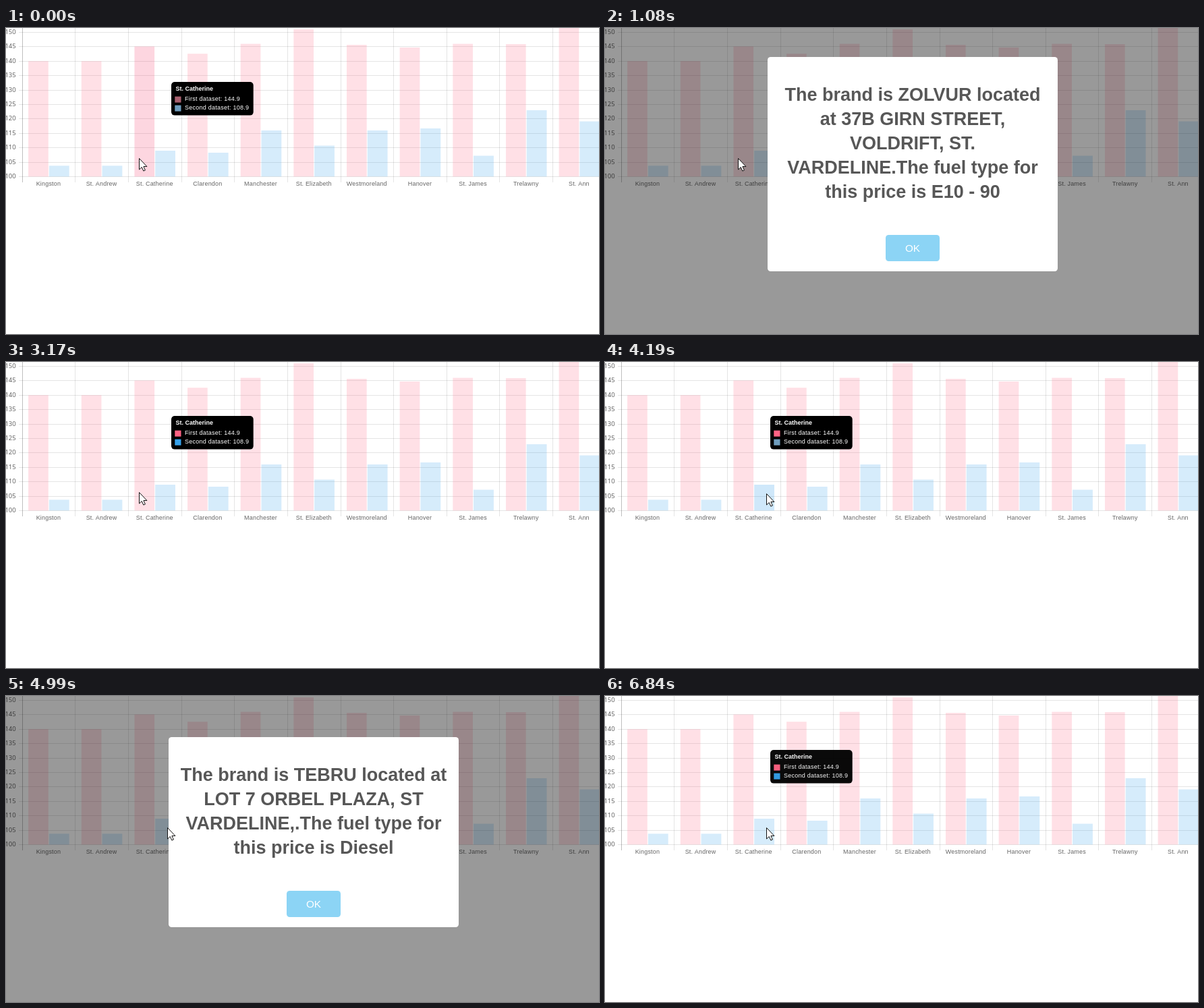
Recreate the animation shown at these times as an HTML page with a canvas. Size 879 px wide and 454 px high, loop 7150 ms.

```html
<!DOCTYPE html>
<html lang="en">
<head>
<meta charset="utf-8">
<title>Price chart</title>
<style>
  html, body { margin: 0; width: 100%; height: 100%; overflow: hidden; background: #fff; }
  canvas { display: block; width: 879px; height: 454px; }
</style>
</head>
<body>
<canvas id="stage" width="879" height="454"></canvas>
<script>
const W = 879, H = 454, LOOP = 7150;
const stage = document.getElementById('stage').getContext('2d');
const layer = document.createElement('canvas').getContext('2d');
layer.canvas.width = W;
layer.canvas.height = H;
let ctx = stage;

const SANS = '"Liberation Sans", Arial, sans-serif';
const BASE = 220.5, LEFT = 24, STEP = 78.65;

const parishes = [
  'Kingston', 'St. Andrew', 'St. Catherine', 'Clarendon', 'Manchester', 'St. Elizabeth',
  'Westmoreland', 'Hanover', 'St. James', 'Trelawny', 'St. Ann'
];
const pinkTops = [49.2, 49.2, 27.4, 38.2, 23.5, 2, 25, 29, 23.5, 24, -20];
const blueTops = [204.3, 204.3, 182, 185, 152, 174.5, 152, 149, 189.5, 122, 138.5];

const PINK = 'rgba(255,99,132,.2)', PINK_HOVER = 'rgba(245,50,100,.2)';
const BLUE = 'rgba(54,162,235,.2)', BLUE_HOVER = 'rgba(15,140,230,.2)';
const KEY = { pink: '#ff6384', blue: '#36a2eb', pinkSoft: '#a8606f', blueSoft: '#6f9dbd' };

const dialogs = [
  { open: 750, close: 2610, gone: 2710, height: 318, lines: [
    'The brand is ZOLVUR located', 'at 37B GIRN STREET,', 'VOLDRIFT, ST.',
    'VARDELINE.The fuel type for', 'this price is E10 - 90'] },
  { open: 4650, close: 6450, gone: 6530, height: 282, lines: [
    'The brand is TEBRU located at', 'LOT 7 ORBEL PLAZA, ST',
    'VARDELINE,.The fuel type for', 'this price is Diesel'] }
];

const clamp = (v) => Math.max(0, Math.min(1, v));
const mix = (a, b, p) => a + (b - a) * p;
const outQuart = (p) => 1 - Math.pow(1 - clamp(p), 4);

// cubic-bezier(.25, .1, .25, 1)
function ease(x) {
  let lo = 0, hi = 1;
  for (let i = 0; i < 24; i++) {
    const s = (lo + hi) / 2, r = 1 - s;
    if (.75 * r * r * s + .75 * r * s * s + s * s * s < x) lo = s; else hi = s;
  }
  const s = lo, r = 1 - s;
  return .3 * r * r * s + 3 * r * s * s + s * s * s;
}

// The screen refreshes slowly: first hold is 100 ms, the rest are equal
const GAP = 76.6;
function held(t) {
  return t < 100 ? 0 : 100 + Math.floor((t - 100) / GAP) * GAP;
}

function popScale(ms) {
  const p = ms / 300;
  if (p < .45) return mix(.7, 1.05, ease(p / .45));
  if (p < .8) return mix(1.05, .95, ease((p - .45) / .35));
  return p < 1 ? mix(.95, 1, ease((p - .8) / .2)) : 1;
}

function text(str, x, y, font, color, align = 'left', spacing = 0, baseline = 'middle') {
  ctx.font = font;
  ctx.fillStyle = color;
  ctx.textAlign = align;
  ctx.textBaseline = baseline;
  ctx.letterSpacing = spacing + 'px';
  ctx.fillText(str, x, y);
}

function box(x, y, w, h, r, color) {
  ctx.beginPath();
  ctx.roundRect(x, y, w, h, r);
  ctx.fillStyle = color;
  ctx.fill();
}

function drawChart(hoverPink, hoverBlue) {
  ctx.fillStyle = '#fff';
  ctx.fillRect(0, 0, W, H);
  for (let i = 0; i <= 10; i++) {
    const y = Math.round(6 + 21.4 * i);
    ctx.fillStyle = 'rgba(0,0,0,.1)';
    ctx.fillRect(19, y, W - 19, 1);
    text(String(150 - 5 * i), 14.7, y + .7, '9.5px "Noto Sans", "Open Sans", sans-serif', '#666', 'right');
  }
  parishes.forEach((name, i) => {
    const x = LEFT + STEP * i;
    ctx.fillStyle = i ? 'rgba(0,0,0,.1)' : 'rgba(0,0,0,.25)';
    ctx.fillRect(Math.floor(x + .1), 0, 1, 229);
    ctx.fillStyle = hoverPink && i === 2 ? PINK_HOVER : PINK;
    ctx.fillRect(x + 9.1, pinkTops[i], 29.7, BASE - pinkTops[i]);
    ctx.fillStyle = hoverBlue && i === 2 ? BLUE_HOVER : BLUE;
    ctx.fillRect(x + 39.9, blueTops[i], 29.8, BASE - blueTops[i]);
    text(name, x + 38.9, 232, '9px ' + SANS, '#666', 'center', .18);
  });
}

function drawTooltip(alpha, pink, blue) {
  if (alpha <= 0) return;
  ctx.save();
  ctx.globalAlpha = alpha;
  box(245, 80, 121.7, 49.6, 5, '#000');
  text('St. Catherine', 251.5, 91, 'bold 9px ' + SANS, '#fff');
  [['First dataset: 144.9', 106, pink], ['Second dataset: 108.9', 119, blue]].forEach(([label, y, color]) => {
    ctx.fillStyle = color;
    ctx.fillRect(250.3, y - 4.4, 9.2, 9);
    text(label, 265, y, '9px ' + SANS, '#fff', 'left', .25);
  });
  ctx.restore();
}

function drawPanel(d, y, scale) {
  const w = 430, h = d.height, top = h / 2 - 54;
  ctx.save();
  ctx.translate(456, y);
  ctx.scale(scale, scale);
  box(-w / 2, -h / 2, w, h, 4.5, '#fff');
  d.lines.forEach((line, i) => {
    text(line, 0, -h / 2 + 65 + 36 * i, 'bold 27px ' + SANS, '#575757', 'center', 0, 'alphabetic');
  });
  box(-40, top, 80, 39, 4.5, '#8cd4f5');
  text('OK', 0, top + 25, '15.3px ' + SANS, '#fff', 'center', 0, 'alphabetic');
  ctx.restore();
}

function drawDialog(d, t) {
  const closing = t >= d.close;
  const age = held(t - d.open) + 17;
  const shade = closing ? .89 : clamp(age / 100);

  ctx.fillStyle = `rgba(0,0,0,${.4 * shade})`;
  ctx.fillRect(0, 0, W, H);
  if (!closing) {
    drawPanel(d, 202, popScale(age));
    return;
  }
  // Fade the panel as one layer
  ctx = layer;
  ctx.clearRect(0, 0, W, H);
  drawPanel(d, 194, 1);
  ctx = stage;
  ctx.globalAlpha = shade;
  ctx.drawImage(layer.canvas, 0, 0);
  ctx.globalAlpha = 1;
}

const arrow = [[0, 0], [0, 16.5], [3.8, 13], [6.3, 18.6], [8.9, 17.5], [6.4, 12], [11.4, 12]];
function drawCursor(x, y) {
  ctx.beginPath();
  arrow.forEach(([dx, dy]) => ctx.lineTo(x + dx + .5, y + dy + .5));
  ctx.closePath();
  ctx.fillStyle = '#fff';
  ctx.fill();
  ctx.strokeStyle = '#111';
  ctx.lineWidth = 1;
  ctx.stroke();
}

function tooltipAt(t) {
  if (t < 750) return [1, KEY.pinkSoft, KEY.blueSoft];
  for (const d of dialogs) {
    if (t >= d.open && t < d.close) {
      return [t < d.open + 100 ? .71 : 0, KEY.pinkSoft, KEY.blueSoft];
    }
  }
  if (t < 2780) return [0, KEY.pink, KEY.blue];
  if (t < 4650) {
    const seen = t >= 3170 ? 400 : held(t - 2610) - 130;
    return [outQuart(seen / 400), KEY.pink, t < 4190 ? KEY.blue : KEY.blueSoft];
  }
  if (t < 6680) return [0, KEY.pink, KEY.blue];
  const seen = Math.min(160, Math.floor((t - 6680) / 80) * 80) + 60;
  return [outQuart(seen / 400), KEY.pink, KEY.blue];
}

function cursorAt(t) {
  if (t < 3770) return [197, 193];
  const p = clamp((Math.floor((t - 3770) / 84) + 1) / 6);
  const e = p * p * (3 - 2 * p);
  return [Math.round(mix(197, 239, e)), Math.round(mix(193, 195, e))];
}

function draw(t) {
  drawChart(t < 750, t >= 4190 && t < 4750);
  drawTooltip(...tooltipAt(t));
  const d = dialogs.find((d) => t >= d.open && t < d.gone);
  if (d) drawDialog(d, t);
  drawCursor(...cursorAt(t));
}

const start = performance.now();
function tick() {
  draw((performance.now() - start) % LOOP);
  requestAnimationFrame(tick);
}
tick();
</script>
</body>
</html>
```
